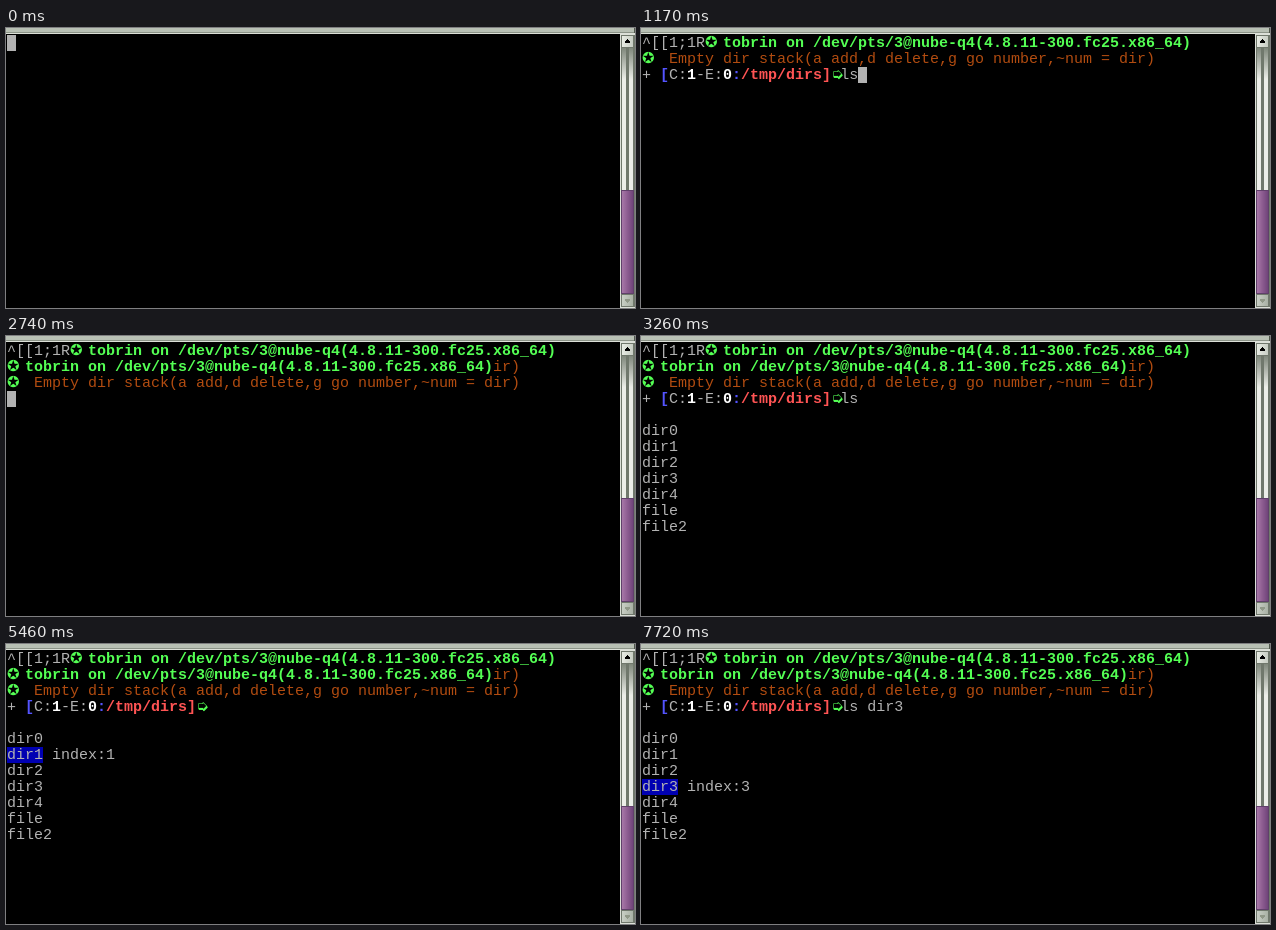
Recreate the animation shown at these times as an HTML page. Size 629 by 280 pixels, loop 8 s.

```html
<!DOCTYPE html>
<html lang="en">
<head>
<meta charset="utf-8">
<title>Terminal</title>
<style>
html, body { margin: 0; width: 100%; height: 100%; overflow: hidden; background: #000; }
#term {
  position: absolute; left: 1px; top: 7px; color: #b2b2b2;
  font: 15px/18px "Liberation Mono", monospace; font-variant-ligatures: none;
}
.row { position: absolute; left: 0; height: 16px; white-space: pre; }
.row b { font-weight: bold; }
.sym {
  display: inline-block; width: 18px; height: 16px; vertical-align: top;
  color: #54ff54; font: bold 15px/14px "DejaVu Sans", sans-serif;
}
.arrow { width: 9px; }
.green { color: #54ff54; }
.rust { color: #b24c10; }
.blue { color: #5454ff; }
.red { color: #ff5454; }
.white { color: #fff; }
.pick { display: inline-block; height: 16px; vertical-align: top; background: #0000b2; }
#cursor { position: absolute; width: 9px; height: 16px; background: #b2b2b2; }
svg { position: absolute; left: 0; top: 0; }
</style>
</head>
<body>
<div id="term"></div>
<svg width="629" height="280" shape-rendering="crispEdges">
  <defs>
    <linearGradient id="thumb"><stop offset="0" stop-color="#a878a8"/><stop offset=".5" stop-color="#8c5c90"/><stop offset="1" stop-color="#70447a"/></linearGradient>
    <linearGradient id="btn" x2="1" y2="1"><stop offset="0" stop-color="#e8ece4"/><stop offset="1" stop-color="#a8b0a4"/></linearGradient>
    <linearGradient id="trough" x2="0" y2="1"><stop offset="0" stop-color="#80887c"/><stop offset=".22" stop-color="#eceee8"/></linearGradient>
  </defs>
  <path fill="#b8c0b4" d="M0 0h629v4H0z"/>
  <path fill="#8c9488" d="M0 4h629v1H0z"/>
  <path fill="#50584c" d="M628 0h1v5h-1z"/>
  <path fill="#dce0d8" d="M0 5h629v1H0z"/>
  <path fill="#dce0d8" d="M614 6h15v274h-15z"/>
  <path fill="#70786c" d="M615 7h14v272h-14z"/>
  <path fill="url(#trough)" d="M616 20h4v142h-4zM623 20h4v142h-4z"/>
  <path fill="url(#btn)" d="M616 8h11v11h-11zM616 267h11v11h-11z"/>
  <path fill="#000" d="M621 11h1v1h1v1h1v2h-5v-2h1v-1h1z"/>
  <path fill="#909888" d="M619 271h5v2h-1v1h-1v1h-1v-1h-1v-1h-1z"/>
  <path fill="#60406a" d="M615 162h13v104h-13z"/>
  <path fill="url(#thumb)" d="M616 163h11v102h-11z"/>
</svg>
<script>
const LOOP = 8000, COL = 9, ROW = 16, INPUT = 22;
const term = document.getElementById('term');
const tag = (cls, text) => `<b class="${cls}">${text}</b>`;
const star = '<span class="sym">✪</span>';
const login = tag('green', 'tobrin on /dev/pts/3@nube-q4(4.8.11-300.fc25.x86_64)');
const stack = 'Empty dir stack(a add,d delete,g go number,~num = dir)';
const rust = text => `<span class="rust">${text}</span>`;
const hint = star + ' ' + rust(stack);
const prompt = `+ ${tag('blue', '[')}C:${tag('white', 1)}-E:${tag('white', 0)}` +
  tag('blue', ':') + tag('red', '/tmp/dirs]') + '<span class="sym arrow">➭</span>';
const files = ['dir0', 'dir1', 'dir2', 'dir3', 'dir4', 'file', 'file2'];

// [start, typed command, picked entry]
const steps = [
  [80, ''], [1000, 'l'], [1080, 'ls'], [1750, 'ls '], [2740, null], [2780, ''],
  [3260, 'ls', -1], [4470, '', 0], [4960, 'ls dir0', 0], [5460, '', 1], [5530, 'ls dir1', 1],
  [6020, '', 2], [6540, 'ls dir2', 2], [7330, '', 3], [7720, 'ls dir3', 3]
];
// times at which the cursor blinks off, on, off, ...
const blinks = [560, 1170, 1790, 2350, 2940, 3530, 4130, 4720, 5320, 5910, 6500, 7100, 7680];

function list(pick) {
  return files.map((f, i) => i === pick ? `<span class="pick">${f}</span> index:${i}` : f);
}

function screen(t) {
  const step = steps.filter(s => s[0] <= t).pop();
  if (!step) return { rows: [], x: 0, y: 0 };
  const [start, cmd, pick] = step;
  const rows = ['^[[1;1R' + star + login];
  if (start >= 2740) rows.push(star + login + rust(stack.slice(-3)));
  rows.push(hint);
  const y = rows.length;
  if (cmd === null) return { rows, x: 0, y };
  rows.push(prompt + cmd);
  if (pick !== undefined) rows.push('', ...list(pick));
  return { rows, x: INPUT + cmd.length, y };
}

let shown = '';
function frame(now) {
  const t = now % LOOP;
  const { rows, x, y } = screen(t);
  const lit = blinks.filter(b => b <= t).length % 2 === 0;
  let html = rows.map((r, i) => `<div class="row" style="top:${i * ROW}px">${r}</div>`).join('');
  if (lit) html += `<div id="cursor" style="left:${x * COL}px;top:${y * ROW}px"></div>`;
  if (html !== shown) term.innerHTML = shown = html;
  requestAnimationFrame(frame);
}
frame(performance.now());
</script>
</body>
</html>
```
